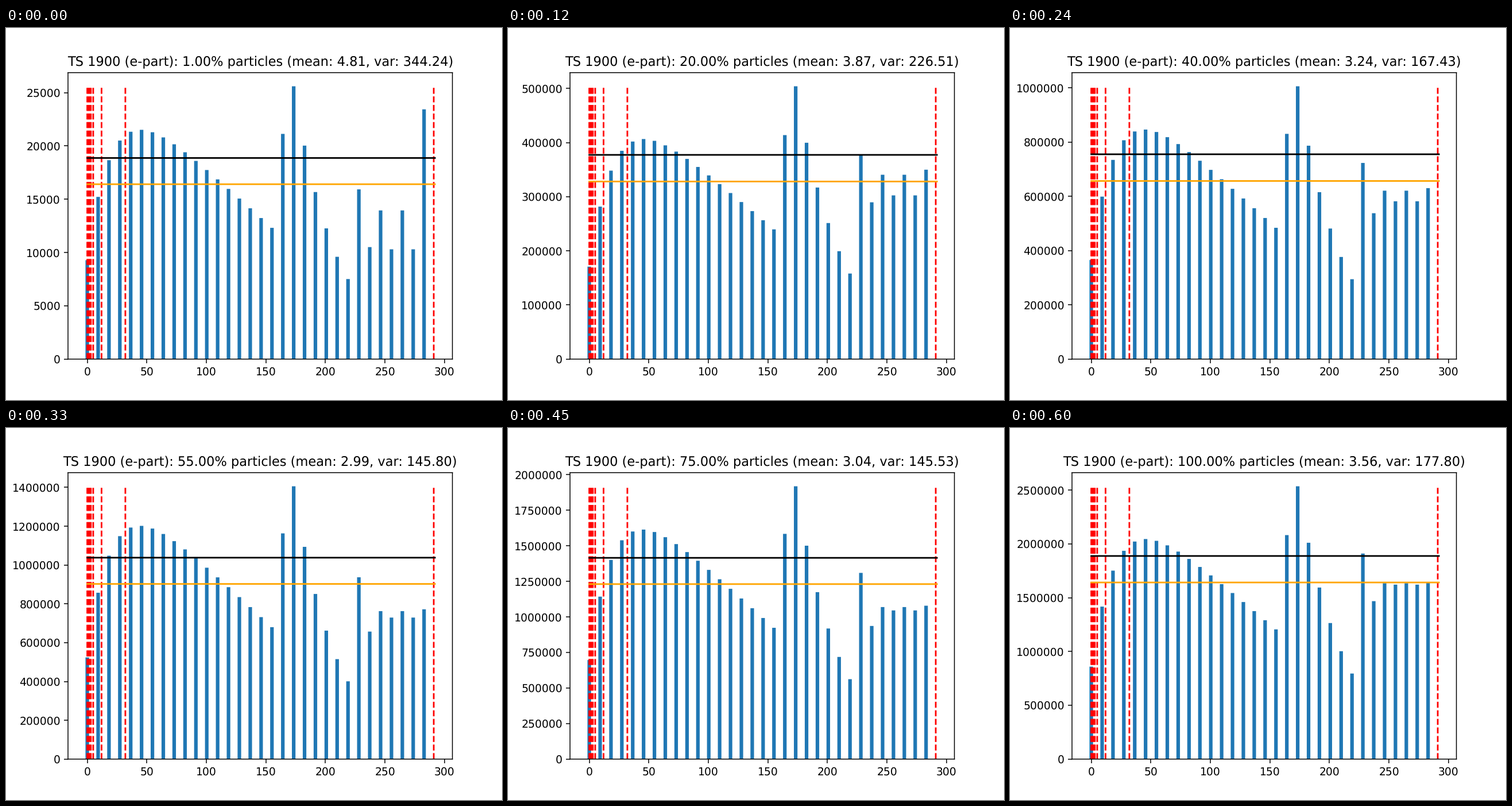
Animation of 864x648 px, one loop 0.63 s. Source, as a matplotlib script:

```python
import matplotlib.pyplot as plt
import numpy as np
from matplotlib.animation import FuncAnimation

FRAMES, INTERVAL = 21, 30
BINS, X_MAX = 32, 292
MEAN_PER_PERCENT = 16410
LIMIT = 1.15                    # black line relative to the orange one
SPLITS = [0, 1, 2, 3, 5, 12, 32, 291]

# Known states; everything between them is interpolated.
PERCENT = [1, 20, 40, 55, 65, 85, 100]
TALLEST = [25600, 504200, 1005400, 1405800, 1675800, 2161500, 2534700]
MEAN = [4.81, 3.87, 3.24, 2.99, 2.77, 3.30, 3.56]
VAR = [344.24, 226.51, 167.43, 145.80, 131.18, 159.87, 177.80]
SINK = [0.3, 1, 0.28, 0, 0, 0.5, 1]             # how far the hump is lowered
TAIL = [225, 303, 284, 252, 237, 281, 305]      # level of the last bars


def shape(percent, sink, tail):
    """Bar heights on a scale where the tallest bar is 475."""
    i = np.arange(18)
    hump = 529 - 17.6 * i - 352 * 0.63 ** i
    hump -= sink * (31 - 1.6 * i - 15 * 0.35 ** i)
    decay = 475 * (0.778 + 0.015 * sink) ** np.arange(6)
    zigzag = 35 * np.exp(-percent / 30) * (-1) ** np.arange(5)
    plateau = tail + zigzag
    plateau[-1] += 176 / percent
    return np.concatenate([hump, [393 - 3 * sink], decay,
                           [120 + 0.78 * tail, tail - 30], plateau])


states = zip(PERCENT, SINK, TAIL)
counts = np.array([shape(*s) for s in states]) * np.array(TALLEST)[:, None] / 475
bar_x = np.arange(BINS) * X_MAX / BINS

# Smooth edges and glyphs, not rounded to whole pixels.
plt.rcParams.update({"path.snap": False, "text.hinting": "no_hinting"})
fig, ax = plt.subplots(figsize=(6.4, 4.8), dpi=135)


def draw(frame):
    percent = max(1, 5 * frame)
    heights = [np.interp(percent, PERCENT, column) for column in counts.T]
    top = max(heights)
    mean = np.interp(percent, PERCENT, MEAN)
    var = np.interp(percent, PERCENT, VAR)
    level = MEAN_PER_PERCENT * percent

    ax.clear()
    ax.bar(bar_x, heights, width=3, color="tab:blue")
    for x in SPLITS:
        ax.plot([x, x], [0, top], "--", color="red")
    ax.plot([0, X_MAX], [level * LIMIT] * 2, color="black")
    ax.plot([0, X_MAX], [level] * 2, color="orange")
    ax.set_ylim(0, 1.05 * top)
    ax.ticklabel_format(axis="y", style="plain", useOffset=False)
    ax.set_title(f"TS 1900 (e-part): {percent:.2f}% particles "
                 f"(mean: {mean:.2f}, var: {var:.2f})")


anim = FuncAnimation(fig, draw, frames=FRAMES, interval=INTERVAL,
                     repeat=True, repeat_delay=0)
plt.show()
```
